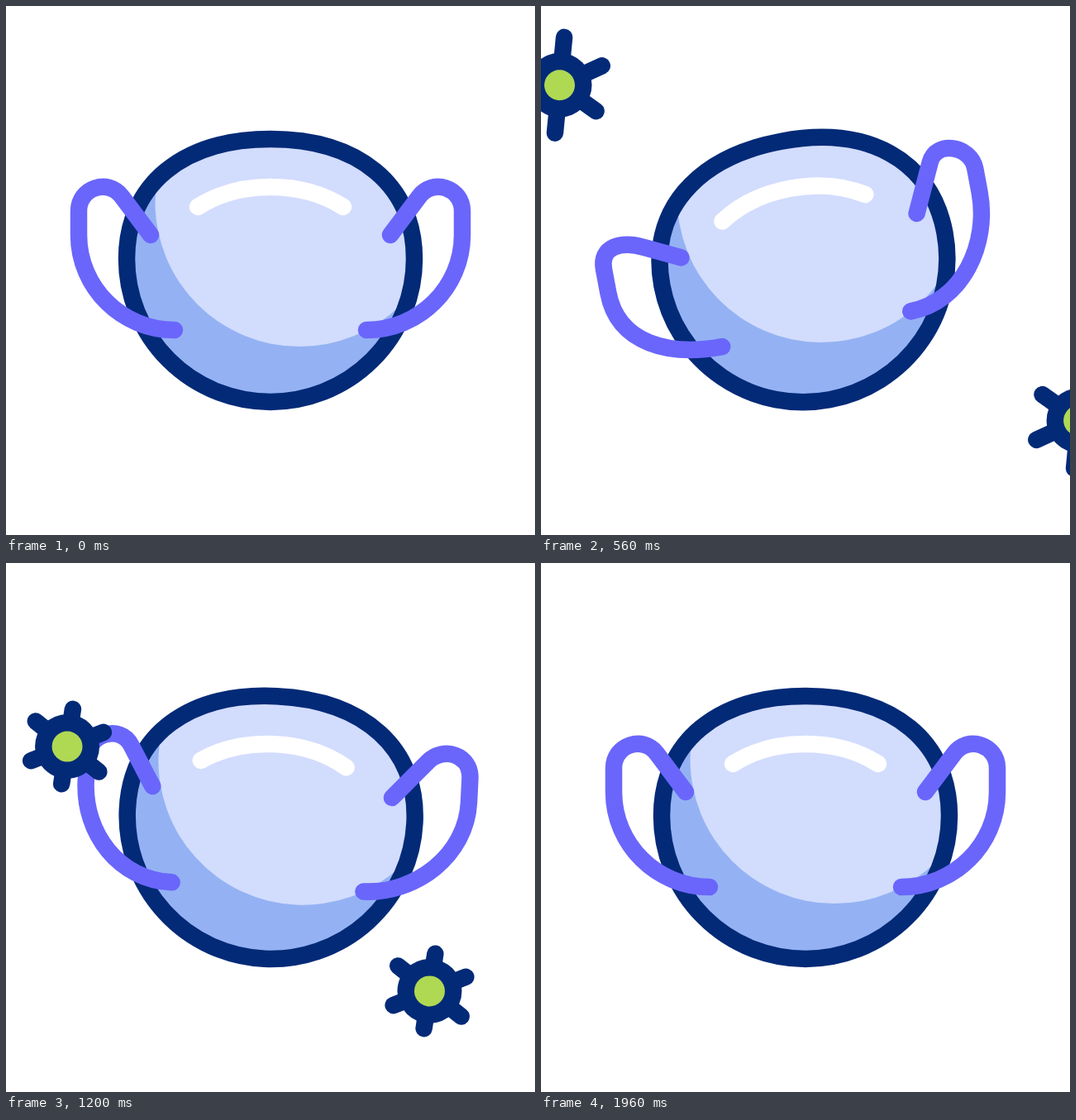
An HTML page that plays this animation: 640 by 640 pixels, repeating every 2040 ms.

```html
<!DOCTYPE html>
<html lang="en">
<head>
<meta charset="utf-8">
<title>Face mask</title>
<style>
  html, body { margin: 0; width: 100%; height: 100%; overflow: hidden; background: #fff; }
  svg { display: block; width: 100%; height: 100%; }
  .line { fill: none; stroke-width: 20.5; stroke-linecap: round; }
</style>
</head>
<body>
<svg viewBox="0 0 640 640">
  <defs>
    <path id="shell" d="M146 306C146 216 214 161 320 161S494 216 494 306A174 173 0 0 1 146 306Z"/>
    <clipPath id="inside"><use href="#shell"/></clipPath>
  </defs>
  <g id="mask">
    <use href="#shell" fill="#94b2f3"/>
    <circle cx="355" cy="237.5" r="174.5" fill="#d2dcfd" clip-path="url(#inside)"/>
    <use href="#shell" class="line" stroke="#032a77"/>
    <path class="line" stroke="#fff" d="M232 243C282 211 358 211 408 243"/>
    <path id="strapL" class="line" stroke="#6a66fb"/>
    <path id="strapR" class="line" stroke="#6a66fb" transform="translate(640 0) scale(-1 1)"/>
  </g>
  <g id="virusL"></g>
  <g id="virusR"></g>
</svg>
<script>
const LOOP = 2040, STEP = 40;
const $ = id => document.getElementById(id);

const easeIn = u => u * u;
const easeOut = u => u * (2 - u);
const smooth = u => u * u * (3 - 2 * u);

// Keys are {time: value}; each stretch between two keys is eased.
function swing(keys, t, eases = []) {
  const times = Object.keys(keys).map(Number), last = times.length - 1;
  if (t <= times[0]) return keys[times[0]];
  if (t >= times[last]) return keys[times[last]];
  const i = times.findIndex(time => time > t) - 1;
  const from = keys[times[i]], to = keys[times[i + 1]];
  const u = (eases[i] || smooth)((t - times[i]) / (times[i + 1] - times[i]));
  return from + (to - from) * u;
}

const TILT = { 80: 0, 400: -16.5, 960: 13.2, 1400: -5.2, 1960: 0 };
const LEAN = { 80: 0, 640: -8, 1040: 10, 1560: -6.5, 1960: 0 };
const DROOP = { 80: 0, 600: 26, 1000: -5, 1400: 0 };
const SPIN = { 400: -13, 720: 1, 1000: 1, 1500: -10 };

// A virus peeks in, charges, slides along the mask and flies off.
const FLIGHT = [easeOut, easeIn, smooth, easeIn];
const LEFT = {
  x: { 240: -90, 400: -26, 720: 168, 1000: 155, 1500: -351 },
  y: { 240: 82, 400: 83, 720: 134, 1000: 155, 1500: 574 }
};
const RIGHT = {
  x: { 240: 770, 400: 701, 720: 499.5, 1000: 473.5, 1500: 717 },
  y: { 240: 508, 400: 508, 720: 482, 1000: 482.5, 1500: 704 }
};

// Point beyond (x2, y2) on the ray from (x1, y1).
function extend(x1, y1, x2, y2, length) {
  const k = length / Math.hypot(x2 - x1, y2 - y1);
  return [x2 + (x2 - x1) * k, y2 + (y2 - y1) * k];
}

// The ends stay on the mask while the loop is shifted by (dx, dy).
function strapPath(dx, dy) {
  const ax = 140.2 + dx, ay = 230.6 + dy, x = 88 + dx, top = 248 + dy, low = 277 + dy;
  return `M175 277L${ax} ${ay}C${extend(175, 277, ax, ay, 28)} ${x} ${top - 28} ${x} ${top}`
    + `V${low}C${x} ${low + 63.5} 140 392 204 392`;
}

for (const id of ['virusL', 'virusR']) {
  $(id).innerHTML = '<path class="line" stroke="#032a77"/>'
    + '<circle r="39" fill="#032a77"/><circle r="18.5" fill="#afd953"/>';
}

// Three bars through the centre stretch and shrink one after another.
function armsPath(t) {
  let d = '';
  for (let i = 0; i < 3; i++) {
    const length = 52.5 + 7.5 * Math.cos(2 * Math.PI * (t - 400 + 70 * i) / 1400);
    const angle = (60 * i - 78.5 + swing(SPIN, t)) * Math.PI / 180;
    const x = length * Math.cos(angle), y = length * Math.sin(angle);
    d += `M${x} ${y}L${-x} ${-y}`;
  }
  return d;
}

function placeVirus(id, path, t) {
  const x = swing(path.x, t, FLIGHT), y = swing(path.y, t, FLIGHT);
  $(id).setAttribute('transform', `translate(${x} ${y})`);
  $(id).firstChild.setAttribute('d', armsPath(t));
}

function draw(t) {
  const lean = swing(LEAN, t), droop = swing(DROOP, t);
  $('mask').setAttribute('transform', `rotate(${swing(TILT, t)} 320 320)`);
  $('strapL').setAttribute('d', strapPath(lean, droop));
  $('strapR').setAttribute('d', strapPath(-lean, -0.45 * droop));
  placeVirus('virusL', LEFT, t);
  placeVirus('virusR', RIGHT, t);
}

const start = performance.now();
function tick() {
  const t = (performance.now() - start) % LOOP;
  draw(Math.floor(t / STEP) * STEP);
  requestAnimationFrame(tick);
}
tick();
</script>
</body>
</html>
```
